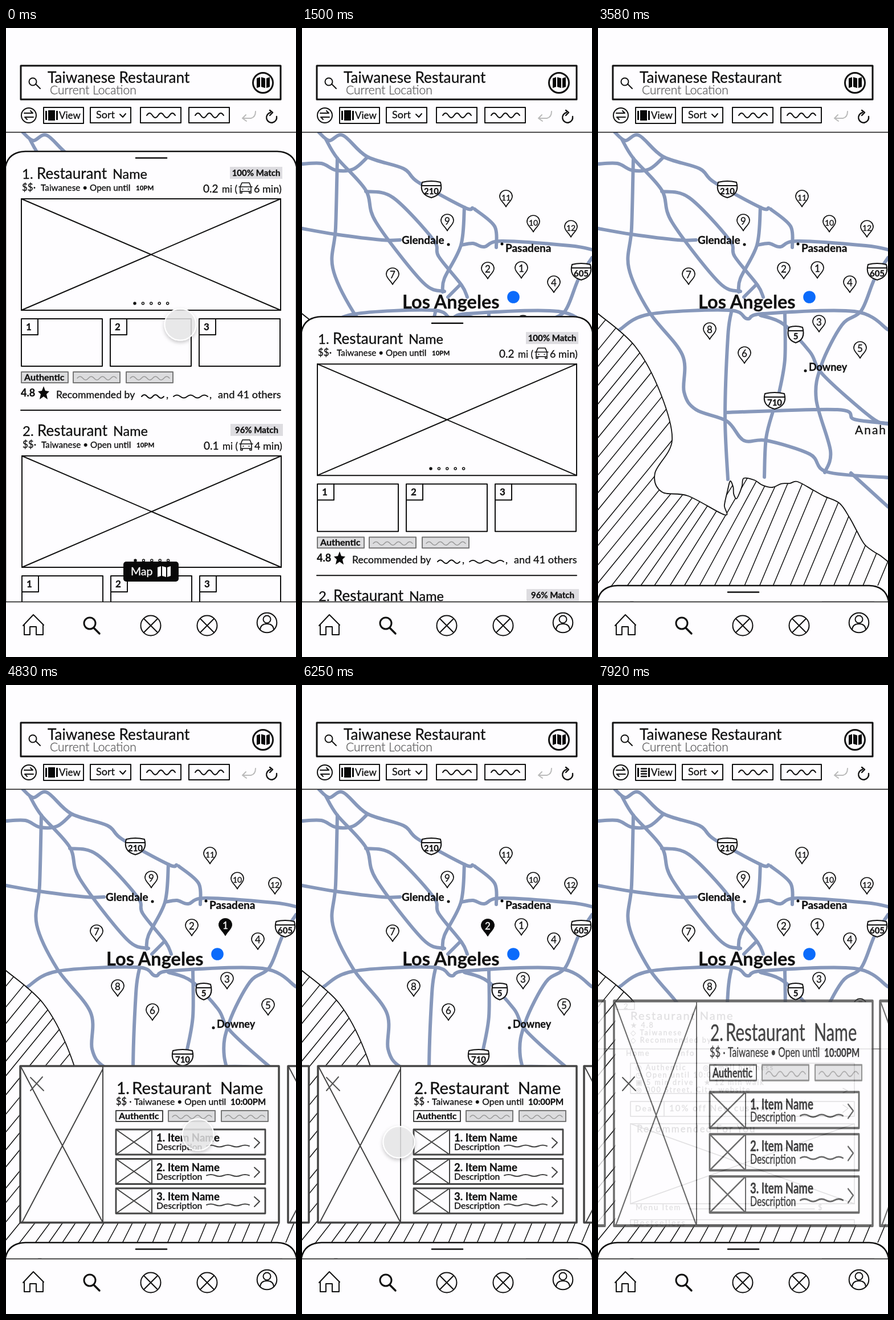
An HTML page that plays this animation: 509 by 1101 pixels, repeating every 8 s.

```html
<!DOCTYPE html>
<html lang="en">
<head>
<meta charset="utf-8">
<title>Restaurant map prototype</title>
<style>
html, body { margin: 0; width: 100%; height: 100%; overflow: hidden; background: #fefdff; }
svg {
  display: block; width: 509px; height: 1101px; font-family: Lato, "Open Sans", sans-serif; color: #111;
  fill: none; stroke: #111; stroke-width: 2; stroke-linecap: round; stroke-linejoin: round;
}
text { fill: currentColor; stroke: currentColor; stroke-width: 0.3; }
.white { color: #fff; }
.paper { fill: #fefdff; }
.flat { fill: #fefdff; stroke: none; }
.ink { fill: #080808; stroke: none; }
.tag { fill: #dcdcde; stroke: #777; }
.match { fill: #dddce0; stroke: none; }
.pale { stroke: #999; stroke-width: 1.5; }
.spot { fill: #0b6bfb; stroke: none; }
.finger { fill: #e9e9ea; fill-opacity: 0.8; stroke: #fff; }
</style>
</head>
<body>
<svg id="stage" viewBox="0 0 509 1101"></svg>
<script>
const text = (x, y, s, size, o = '') => `<text x="${x}" y="${y}" font-size="${size}" ${o}>${s}</text>`;
const mid = 'text-anchor="middle"', bold = 'font-weight="700"';
const path = (d, o = '') => `<path d="${d}" ${o}/>`;
const box = (x, y, w, h, o = '') => `<rect x="${x}" y="${y}" width="${w}" height="${h}" ${o}/>`;
const ring = (x, y, r, o = '') => `<circle cx="${x}" cy="${y}" r="${r}" ${o}/>`;
const group = (id, s, o = '') => `<g id="${id}" ${o}>${s}</g>`;
const each = (n, f) => Array.from({ length: n }, (_, i) => f(i)).join('');
const cross = (x, y, w, h, o = '') => box(x, y, w, h, o) + path(`M${x} ${y}l${w} ${h}M${x + w} ${y}l${-w} ${h}`);
const wave = (x, y, w, n, amp, o = '') =>
  path(`M${x} ${y}` + each(n, i => `q${w / n / 2} ${i % 2 ? amp : -amp} ${w / n} 0`), o);

let seed = 7;
const random = () => (seed = seed * 16807 % 2147483647) / 2147483647;
const points = s => s.split(' ').map(p => p.split(',').map(Number));

// Smooth line through key points
function curve(p) {
  const at = i => p[Math.min(p.length - 1, Math.max(0, i))];
  let d = 'M' + p[0];
  for (let i = 0; i < p.length - 1; i++) {
    const [a, b, c, e] = [at(i - 1), at(i), at(i + 1), at(i + 2)];
    d += `C${[0, 1].map(j => b[j] + (c[j] - a[j]) / 6)} ${[0, 1].map(j => c[j] - (e[j] - b[j]) / 6)} ${c}`;
  }
  return d;
}
const road = s => path(curve(points(s)));

// Adds small bumps between key points
function rough(p, amp) {
  return p.flatMap((a, i) => {
    const b = p[i + 1];
    if (!b) return [a];
    return [0, 1 / 3, 2 / 3].map(k => a.map((v, j) => v + (b[j] - v) * k + (k ? (random() - 0.5) * amp : 0)));
  });
}

const coast = curve([
  ...points('0,500 65,557 110,640 130,722 100,779 112,812 158,819'),
  ...rough(points('222,852 232,793 243,824 256,788 306,804 350,794 424,832 468,904 509,934'), 7)
]);

const hatch = () => path(each(42, i => {
  const b = -500 + i * 26 + random() * 6;
  const lean = 0.82 - 0.4 * Math.min(1, Math.max(0, b / 260));
  return `M${b} 976l${lean * 490} -490`;
}), 'stroke-width="1.5" clip-path="url(#sea)"');

const pin = (x, y, n, dark) =>
  path(`M${x} ${y + 15}c-3-7-11-11-11-18a11 11 0 0 1 22 0c0 7-8 11-11 18Z`, `fill="${dark ? '#080808' : '#fefdff'}" stroke-width="1.7"`) +
  text(x, y + 4, n, n > 9 ? 14 : 17, mid + (dark ? ' class="white"' : ''));

const shield = (x, y, n, w) =>
  path(`M${x - w / 2} ${y - 13}q${w / 2} -4 ${w} 0q6 21 ${-w / 2} 27q${-w / 2 - 6} -6 ${-w / 2} -27Z`, 'class="paper"') +
  path(`M${x - w / 2} ${y - 7}h${w}`) + text(x, y + 8, n, 15, mid + bold);

const dot = (x, y) => ring(x, y, 2.5, 'class="ink"');

function mapView() {
  const roads = [
    '30,183 48,197 72,188 114,225 178,246 204,270 285,314 299,315', '303,317 338,347 341,384',
    '0,238 34,237 60,249 90,247 114,227', '42,195 62,228 112,284 130,340 212,445 250,461',
    '62,228 59,350 54,420 90,497 148,572 151,637 172,668 226,688 256,722 296,722 372,746 402,777 509,787',
    '0,351 58,361 140,371 172,371', '112,286 160,297 230,370 240,400 280,450 290,471',
    '285,314 279,380 250,438 247,462', '278,449 256,471', '280,380 300,377 320,383 350,373 470,381 509,388',
    '38,528 90,501 230,494 262,509 290,500 450,496 509,528',
    '509,402 485,440 462,495 428,520 392,590 383,650 408,740 398,778',
    '285,503 325,518 372,567 395,607 480,682 509,693', '234,497 228,540 223,680 228,790',
    '328,500 328,580 318,638', '308,668 295,718 292,786', '224,673 420,668 450,685 509,692', '444,779 509,838'
  ];
  const pins = points('385,423 326,424 388,517 442,448 460,563 257,572 159,434 196,530 255,340 406,342 358,298 472,351');
  return box(0, 183, 509, 820, 'class="flat"') + hatch() +
    group('roads', roads.map(road).join(''), 'stroke="#8798bb" stroke-width="6"') + path(coast, 'stroke-width="1.8"') +
    shield(227, 283, 210, 32) + shield(490, 427, 605, 32) + shield(347, 537, 5, 24) + shield(310, 653, 710, 34) +
    text(175, 378, 'Glendale', 19, bold) + dot(257, 379) + text(357, 392, 'Pasadena', 19, bold) + dot(351, 378) +
    text(370, 600, 'Downey', 18, bold) + dot(364, 600) +
    text(451, 711, 'Anah', 21, 'letter-spacing="2"') + text(176, 491, 'Los Angeles', 32.5, bold) +
    pins.map((p, i) => pin(...p, i + 1)).join('') +
    group('dark1', pin(...pins[0], 1, true)) + group('dark2', pin(...pins[1], 2, true)) +
    ring(371, 471, 10.8, 'class="spot"');
}

const tags = (x, y, gap) => text(x + 5, y + 15, 'Authentic', 16, bold) +
  each(2, i => box(x + gap + i * 93, y, 82, 19, 'class="tag"') + wave(x + gap + i * 93 + 7, y + 11, 69, 7, 6, 'class="pale"'));

const car = y => path(`M411 ${y - 1}v-8l3-7h13l3 7v8zM409 ${y - 9}h23M411 ${y - 1}v3h3v-3M427 ${y - 1}v3h3v-3M415 ${y - 5}h1M425 ${y - 5}h1`, 'stroke-width="1.6"');

function entry(n, match, miles, mins) {
  const s = text(28, 264, n + '.', 24) + text(54, 264, 'Restaurant', 26) + text(187, 264, 'Name', 23.5) +
    text(28, 285, '$$·', 17) + text(61, 285, 'Taiwanese • Open until', 15.3) + text(228, 284, '10PM', 11.5, bold) +
    box(393, 243, 92, 21, 'class="match"') + text(439, 259, match + '% Match', 15, mid + bold) +
    text(346, 288, miles, 19) + text(379, 288, 'mi (', 17) + car(287) + text(435, 288, mins + ' min)', 18) +
    cross(27, 299, 455, 195) +
    each(5, i => ring(226 + i * 14.4, 482, 2, `stroke-width="1.5" fill="${i ? 'none' : '#111'}"`)) +
    each(3, i => {
      const x = 27 + i * 156;
      return box(x, 509, 142, 83) + path(`M${x} 537h29v-28`) + text(x + 13, 529, i + 1, 17, mid + bold);
    }) +
    box(27, 602, 82, 19, 'class="tag"') + tags(27, 602, 91) + text(26, 645, '4.8', 18, bold) +
    path('M66 627l3 8 7 1-5 5 2 9-7-5-7 5 2-9-5-5 7-1z', 'class="ink"') +
    text(88, 648, 'Recommended by', 17.6) + wave(238, 645, 39, 4, 6) + text(281, 648, ',', 18) +
    wave(294, 645, 60, 5, 5) + text(357, 648, ',', 18) + text(372, 648, 'and 41 others', 18.2) + path('M26 669H482');
  return `<g transform="translate(${n - 1} ${(n - 1) * 450})">${s}</g>`;
}

const sheet = () => path('M-1 243Q4 217 34 216H476Q505 217 510 243V1900H-1Z', 'class="paper" stroke-width="2.6"') +
  path('M228 227.500H282', 'stroke-width="2.6"') + entry(1, 100, '0.2', 6) + entry(2, 96, '0.1', 4);

const foldMap = (x, y, color) =>
  path(`M${x - 11} ${y - 8}l6-2v17l-6 2zM${x - 3} ${y - 10}l7 2v17l-7-2zM${x + 6} ${y - 8}l6-2v17l-6 2z`, `fill="${color}" stroke="none"`);

const mapButton = () => box(206, 934, 97, 35, 'rx="5" class="ink"') +
  text(219, 958, 'Map', 19.5, 'class="white"') + foldMap(277, 952, '#fff');

function card(n, x) {
  const s = box(25, 667, 454, 274, 'class="paper" stroke-width="3.5"') +
    path('M170 667V941M26 668L170 941M170 672L28 941') +
    text(194, 716, n + '.', 28) + text(221, 716, 'Restaurant', 29.5) + text(376, 716, 'Name', 29) +
    text(193, 735, '$$ ·', 16.5) + text(225, 735, 'Taiwanese • Open until', 15.7) + text(394, 735, '10:00PM', 15, bold) +
    box(193, 745, 82, 19) + tags(193, 745, 92) +
    each(3, i => {
      const y = 778 + i * 51.5;
      return box(193, y, 262, 44, 'stroke-width="2.8"') + cross(193, y, 63, 44) +
        text(264, y + 21, `${i + 1}. Item Name`, 18.6, bold) + text(264, y + 36, 'Description', 15.8) +
        wave(352, y + 29, 75, 5, 3) + path(`M436 ${y + 15}l9 8-9 9`);
    });
  return `<g transform="translate(${x} 0)">${s}</g>`;
}

function detail() {
  const lines = (x, y, list) => list.map((s, i) => text(x, y + i * 13, s, 12.5)).join('');
  return box(31, 555, 450, 390, 'class="flat"') + box(31, 555, 33, 13) + text(45, 567, '2', 13) +
    text(57, 586, 'Restaurant Name', 20) + lines(57, 600, ['★ 4.8', '◇ Taiwanese', '◇ Recommended by']) +
    path('M0 637H509') + text(49, 649, 'Home', 13) + text(140, 649, 'Info', 13) +
    box(57, 662, 393, 53) + path('M430 706l8 4-8 4') +
    lines(66, 674, ['◎ Authentic', '◷ Open until 10:00PM', '▣ 5 min drive', '◎ 000 Street, City, website']) +
    text(184, 674, '◎ Small business', 12.5) + text(186, 700, '★ 12 min walk', 12.5) +
    box(57, 729, 393, 26) + path('M116 729v26M430 735l9 6-9 7') + text(65, 746, 'Deal', 14) + text(125, 746, '10% off  New customers', 15) +
    text(68, 783, 'Recommended For You', 17) + cross(57, 768, 393, 140) +
    text(66, 919, 'Menu Item', 13) + path('M160 917H380') + text(386, 919, '$', 13) + box(57, 936, 393, 9) + text(62, 947, 'Bestsellers', 15);
}

function header() {
  const bar = x => box(x, 145, 3, 16, 'class="ink"');
  return box(0, 0, 509, 182, 'class="flat"') + path('M0 182.500H509', 'stroke-width="1.6"') +
    box(26, 66, 456, 59, 'stroke-width="3"') + ring(47, 94, 6.5) + path('M52 98l8 8') +
    text(73, 96, 'Taiwanese Restaurant', 26.2) + text(77, 116, 'Current Location', 21, 'font-weight="300" opacity="0.7"') +
    ring(451, 96, 17.5, 'stroke-width="3"') + foldMap(451, 96, '#080808') +
    ring(40, 153, 13) + path('M32 149H47l-4-4M48 156H33l4 4') +
    box(66, 139, 70, 28) + bar(69) + bar(88) + group('bars', box(74, 144, 12, 18, 'class="ink"')) +
    group('rows', path(each(4, i => `M76 ${146.5 + i * 4.5}h9`), 'stroke-width="2.6"')) +
    text(93, 159, 'View', 17) + box(148, 139, 71, 27) + text(158, 158, 'Sort', 18) + path('M200 151l5 5 5-6') +
    each(2, i => box(236 + i * 85, 139, 71, 27) + wave(247 + i * 85, 153, 50, 5, 8)) +
    path('M421 152l-6 6 7 5M416 158H430Q438 156 438 146', 'stroke="#bbb"') +
    path('M464 148A9 9 0 1 0 475 155M463 144l5 4-5 5', 'stroke-width="2.4"');
}

const nav = () => box(0, 1004, 509, 97, 'class="flat"') + path('M0 1004.500H509', 'stroke-width="1.6"') +
  path('M30 1046L48 1027L66 1045M32 1044V1062H42V1048H53V1062H65V1044') +
  ring(147, 1042, 10, 'stroke-width="3"') + path('M154 1050l10 10', 'stroke-width="3.5"') +
  each(2, i => ring(254 + i * 99, 1046, 17.5) + path(`M${242 + i * 99} 1034l24 24m0-24l-24 24`)) +
  ring(458, 1041, 17.3) + ring(458, 1035, 6.5) + path('M446 1053Q447 1043 458 1043T470 1053');

document.getElementById('stage').innerHTML =
  `<defs><clipPath id="sea"><path d="${coast}V976H0Z"/></clipPath>
  <filter id="shade" x="-40%" y="-40%" width="180%" height="180%"><feDropShadow dx="0" dy="3" stdDeviation="3" flood-opacity=".25"/></filter></defs>` +
  mapView() +
  group('deck', box(479, 667, 30, 275, 'class="flat"') +
    group('detail', detail(), 'letter-spacing="2" stroke="#777" stroke-width="1.5" color="#777"') +
    group('cards', card(1, 0) + card(2, 470) + card(3, 937), 'stroke="#444"') +
    path('M43 687L66 710M64 686L43 710', 'stroke="#555"')) +
  group('sheet', sheet()) + group('button', mapButton()) + nav() + header() +
  group('touch', ring(0, 0, 27.5, 'class="finger"'), 'filter="url(#shade)"');

const el = id => document.getElementById(id);
const span = (t, start, length) => Math.min(1, Math.max(0, (t - start) / length));
const ease = (t, start, length) => (1 - Math.cos(Math.PI * span(t, start, length))) / 2;
const move = (id, x, y, sy = 1) => el(id).setAttribute('transform', `translate(${x} ${y}) scale(1 ${sy})`);
const fade = (id, a) => el(id).setAttribute('opacity', a);
const shown = (t, from, to) => span(t, from, 150) * (1 - span(t, to, 150));

// start, length, x, y
const glides = [
  [80, 480, 255, 951], [2080, 540, 330, 587], [2760, 480, 385, 423],
  [4330, 420, 337, 787], [5220, 360, 170, 800], [6920, 600, 254, 720]
];

function draw(t) {
  const drop = ease(t, 1062, 1035);
  move('sheet', 0, 760 * drop);
  move('button', 0, 1110 * drop);

  const rise = ease(t, 3560, 850), swipe = ease(t, 5220, 1020), grow = span(t, 7700, 216) ** 2;
  const scale = 1 + 0.436 * grow, top = 667 - 114 * grow;
  move('deck', 0, 345 * (1 - rise));
  move('cards', -467 * swipe, top - 667 * scale, scale);
  move('detail', 0, top - 553 * scale / 1.436, scale / 1.436);
  fade('cards', 1 - 0.22 * grow);
  fade('detail', grow);

  fade('dark1', rise * (1 - swipe));
  fade('dark2', grow > 0 ? 0 : swipe);
  fade('bars', grow > 0 ? 0 : 1);
  fade('rows', grow > 0 ? 1 : 0);

  const [x, y] = glides.reduce(([px, py], [start, length, gx, gy]) => {
    const k = ease(t, start, length);
    return [px + (gx - px) * k, py + (gy - py) * k];
  }, [306, 519]);
  move('touch', x, y);
  fade('touch', shown(t, -150, 430) + shown(t, 2200, 3420) + shown(t, 4420, 7750));
}

const start = performance.now();
function tick() {
  const t = (performance.now() - start) % 8000;
  draw(Math.min(7999, Math.floor((t + 4) * 0.012) / 0.012)); // twelve pictures a second
  requestAnimationFrame(tick);
}
tick();
</script>
</body>
</html>
```
